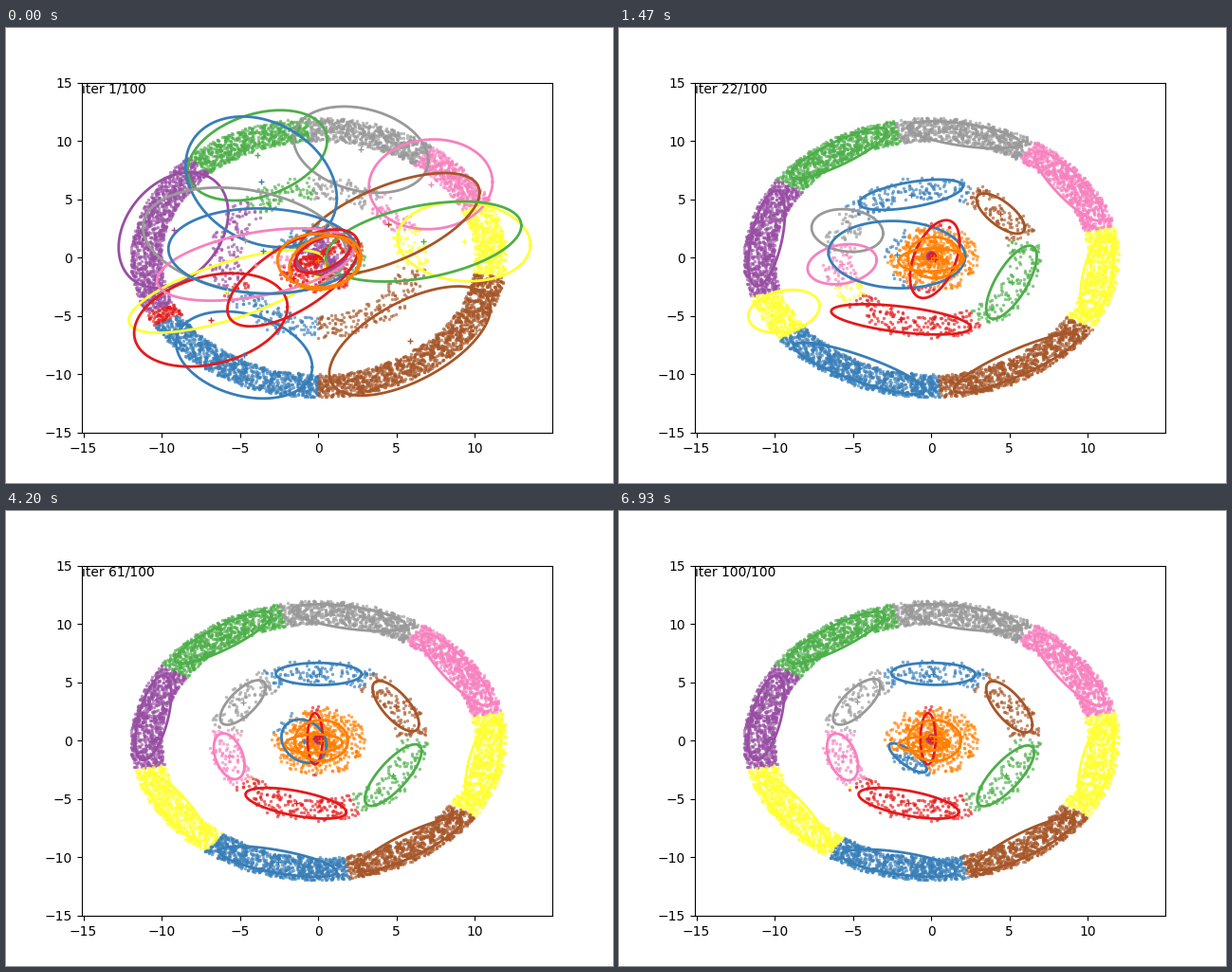
These frames come from a looping animation (640 px wide and 480 px high, 7000 ms). A matplotlib script:

```python
import numpy as np
import matplotlib.pyplot as plt
from matplotlib.animation import FuncAnimation

FRAMES, INTERVAL = 100, 70
COLORS = plt.get_cmap("Set1").colors
RED, BLUE, GREEN, PURPLE, ORANGE, YELLOW, BROWN, PINK, GRAY = range(9)
SCALE = 1.5     # drawn outline, in standard deviations
REGROUP = 14    # frame from which the middle ring has its own sectors

rng = np.random.default_rng(4)


def pose(x, y, w, h, rho):
    """Ellipse from centre, half width, half height and correlation."""
    return np.array([x, y, w * w, rho * w * h, h * h])


class Ring:
    """Annulus of coloured sectors whose start angles relax to their ends."""

    def __init__(self, radius, colors, starts, ends, delay, tau):
        self.radius, self.delay, self.tau = radius, delay, tau
        self.colors = np.array(colors)
        self.starts, self.ends = np.array(starts), np.array(ends)

    def bounds(self, frame):
        left = np.exp(-np.maximum(frame - self.delay, 0) / self.tau)
        return self.ends + (self.starts - self.ends) * left

    def labels(self, angles, frame):
        b = self.bounds(frame)
        turned = (angles - b[0]) % 360 + b[0]
        return self.colors[np.searchsorted(b, turned, side="right") - 1]

    def sector(self, k):
        """Function of the frame: outline of the uniformly filled sector k."""
        def outline(frame):
            b = self.bounds(frame)
            low, high = np.radians(np.append(b, b[0] + 360)[k:k + 2])
            mid, half = (low + high) / 2, max((high - low) / 2, 0.05)
            mean_cos = np.sin(half) / half
            wave = np.sin(2 * half) / (4 * half)
            r2 = self.radius ** 2
            radial = SCALE ** 2 * (1 / 3 + r2 * (0.5 + wave - mean_cos ** 2))
            tangent = SCALE ** 2 * r2 * (0.5 - wave)
            c, s = np.cos(mid), np.sin(mid)
            return np.array([
                self.radius * mean_cos * c, self.radius * mean_cos * s,
                radial * c * c + tangent * s * s, (radial - tangent) * c * s,
                radial * s * s + tangent * c * c])
        return outline


# The red outer sector shrinks to nothing; the other eight even out.
late = np.isin(np.arange(9), [4, 5, 6, 7])
outer = Ring(11, [PINK, GRAY, GREEN, PURPLE, RED, YELLOW, BLUE, BROWN, YELLOW],
             starts=[24, 53, 93, 134, 203, 209, 209, 270, 352],
             ends=12 + 45 * np.array([0, 1, 2, 3, 4, 4, 5, 6, 7]),
             delay=np.where(late, REGROUP, 0),
             tau=np.where(late, [0, 0, 0, 0, 8, 5, 25, 28, 0], 9))
middle = Ring(6, [BROWN, BLUE, GRAY, PINK, YELLOW, RED, GREEN],
              starts=[25, 68, 157, 168, 193, 215, 302],
              ends=[2, 58, 119, 171, 217, 217, 293],
              delay=REGROUP, tau=15)


class Component:
    """Ellipse that glides from its start through moves (begin, tau, goal)."""

    def __init__(self, color, start, *moves):
        self.color, self.start, self.moves = color, start, moves

    def state(self, frame):
        now = self.start
        for begin, tau, goal in self.moves:
            target = goal(frame) if callable(goal) else goal
            t = max(frame - begin, 0) / tau
            now = target + (now - target) * np.exp(-t * t)
        return now


FAST, SLOW = 6, 14
components = [
    # outer ring
    Component(GRAY, pose(2.73, 9.25, 4.3, 3.7, -.25),
              (0, FAST, outer.sector(1))),
    Component(GREEN, pose(-3.88, 8.76, 4.45, 3.87, .33),
              (0, FAST, outer.sector(2))),
    Component(PINK, pose(7.19, 6.28, 3.95, 3.85, .05),
              (0, FAST, outer.sector(0))),
    Component(PURPLE, pose(-9.25, 2.35, 3.5, 4.95, .3),
              (0, FAST, outer.sector(3))),
    Component(BLUE, pose(-4.73, -8.35, 4.35, 3.73, -.28),
              (0, FAST, outer.sector(6))),
    Component(BROWN, pose(5.86, -7.15, 5.15, 4.68, .6),
              (0, FAST, outer.sector(7))),
    Component(YELLOW, pose(9.31, 1.37, 4.25, 3.4, -.08),
              (0, FAST, outer.sector(8))),
    Component(YELLOW, pose(-5.8, -2.9, 6.3, 3.55, .7),
              (0, SLOW, outer.sector(5))),
    # middle ring
    Component(BROWN, pose(4.46, 2.85, 5.85, 4.4, .62),
              (0, FAST, middle.sector(0))),
    Component(GREEN, pose(6.73, 1.37, 6.25, 3.43, .4),
              (0, FAST, middle.sector(6))),
    Component(BLUE, pose(-3.64, 6.49, 4.83, 5.6, -.25),
              (0, FAST, middle.sector(1))),
    Component(RED, pose(-6.86, -5.35, 4.9, 4.0, .28),
              (0, FAST, pose(-4, -5.15, 6.5, 1.2, -.6)),
              (REGROUP, FAST, middle.sector(5))),
    Component(GRAY, pose(-4.7, 1.45, 6.5, 4.55, -.25),
              (0, SLOW, middle.sector(2))),
    Component(PINK, pose(-4, -.6, 6.3, 3.1, .45),
              (0, SLOW, middle.sector(3))),
    # core
    Component(BLUE, pose(-3.52, .56, 6.05, 3.65, -.05),
              (0, 25, pose(-.9, -.05, 1.4, 1.85, -.2)),
              (60, 18, pose(-1.5, -1.5, 1.2, 1.25, -.8))),
    Component(RED, pose(-1.6, -1.75, 4.2, 4.15, .65),
              (0, FAST, pose(.4, -.25, 1.85, 3.7, .5)),
              (REGROUP, 12, pose(-.2, .15, .48, 2.2, 0))),
    Component(PURPLE, pose(.3, .3, 1.7, 1.6, .3),
              (0, FAST, pose(0, .1, .25, .35, 0))),
    Component(RED, pose(.3, .3, 1.8, 1.6, .5),
              (0, FAST, pose(.05, .1, .2, .25, 0))),
    Component(ORANGE, pose(0, -.25, 2.6, 2.3, 0),
              (0, FAST, pose(.2, 0, 1.7, 1.75, 0))),
    Component(ORANGE, pose(.45, -.45, 2.3, 2.3, .2),
              (0, FAST, pose(0, -.2, 2.1, 1, .1)),
              (REGROUP, 50, pose(-.5, -.3, 1.6, .6, .1))),
]
owner_colors = np.array([c.color for c in components])


def scatter_ring(count, low, high):
    angle = rng.uniform(0, 360, count)
    radius = rng.uniform(low, high, count)
    t = np.radians(angle)
    return angle, np.column_stack([radius * np.cos(t), radius * np.sin(t)])


outer_angle, outer_xy = scatter_ring(6500, 10, 12)
middle_angle, middle_xy = scatter_ring(750, 5, 7)
core_angle, core_xy = scatter_ring(700, 0, 3)
points = np.vstack([outer_xy, middle_xy, core_xy])


def likeliest(xy, states, frame):
    """Colour of the component with the highest score at each point."""
    orange_bias = 1.5 - 3 * np.exp(-frame / 4)
    scores = []
    for comp, (mx, my, xx, cross, yy) in zip(components, states):
        dx, dy = xy[:, 0] - mx, xy[:, 1] - my
        det = xx * yy - cross ** 2
        dist = (yy * dx ** 2 - 2 * cross * dx * dy + xx * dy ** 2) / det
        bias = orange_bias if comp.color == ORANGE else 0
        scores.append(bias - dist * SCALE ** 2 / 2 - 0.25 * np.log(det))
    return owner_colors[np.argmax(scores, axis=0)]


def point_colors(frame, states):
    if frame == 0:
        mid = outer.labels(middle_angle, frame)
    elif frame < REGROUP:
        mid = likeliest(middle_xy, states, frame)
    else:
        mid = middle.labels(middle_angle, frame)
    return np.concatenate([outer.labels(outer_angle, frame), mid,
                           likeliest(core_xy, states, frame)])


fig, ax = plt.subplots(figsize=(6.4, 4.8), dpi=100)
ax.set_xlim(-15.1, 14.96)
ax.set_ylim(-15.04, 15)

dots = [ax.plot([], [], "o", color=c, ms=2.5, mew=0, alpha=0.65, zorder=1)[0]
        for c in COLORS]
outlines = [ax.plot([], [], color=COLORS[c.color], lw=2)[0] for c in components]
centres = [ax.plot([], [], "+", color=COLORS[c.color], ms=4.4, mew=1)[0]
           for c in components]
label = ax.text(-15.13, 14.08, "", clip_on=True)

turn = np.linspace(0, 2 * np.pi, 121)
circle = np.array([np.cos(turn), np.sin(turn)])


def update(frame):
    states = [c.state(frame) for c in components]
    colors = point_colors(frame, states)
    for k, dot in enumerate(dots):
        dot.set_data(*points[colors == k].T)
    for line, centre, (mx, my, xx, cross, yy) in zip(outlines, centres, states):
        x, y = np.linalg.cholesky([[xx, cross], [cross, yy]]) @ circle
        line.set_data(mx + x, my + y)
        centre.set_data([mx], [my])
    label.set_text(f"iter {frame + 1}/{FRAMES}")
    return [*dots, *outlines, *centres, label]


anim = FuncAnimation(fig, update, frames=FRAMES, interval=INTERVAL,
                     init_func=lambda: update(0), repeat=True, repeat_delay=0)
plt.show()
```
